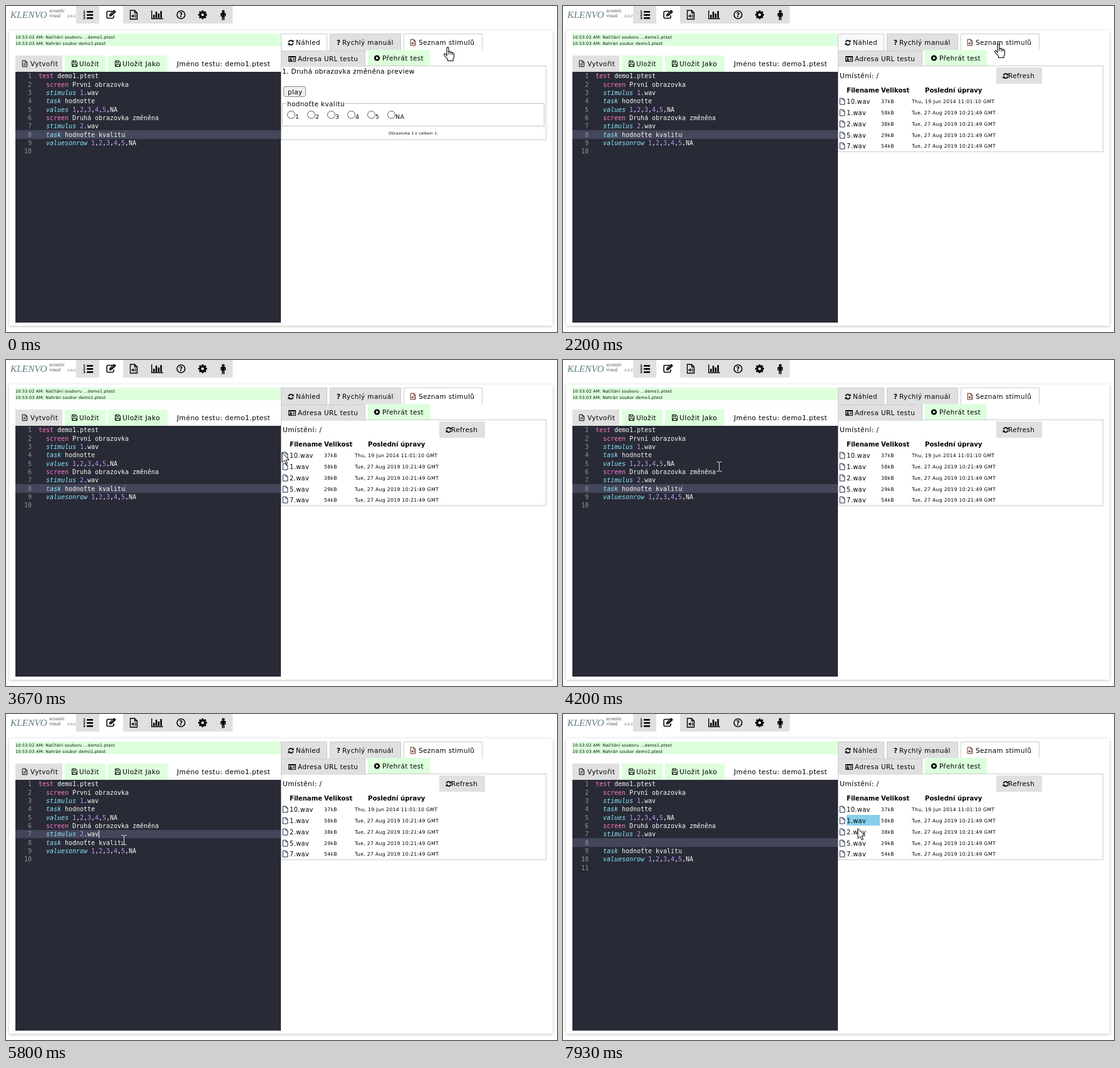
These frames come from a looping animation (880x520 px, 8 s). An HTML page with a canvas:

```html
<!DOCTYPE html>
<html lang="cs">
<head>
<meta charset="utf-8">
<title>Editor testu</title>
<style>
  html, body { margin: 0; width: 880px; height: 520px; overflow: hidden; background: #fff; }
  canvas { display: block; }
</style>
</head>
<body>
<canvas id="stage" width="880" height="520"></canvas>
<script>
const ctx = document.getElementById('stage').getContext('2d');
const LOOP = 8000, FPS = 15;
const SANS = '"DejaVu Sans", sans-serif', MONO = '"DejaVu Sans Mono", monospace';
const SERIF = '"Liberation Serif", serif';
const GRAY = '#e0e0e0', GREEN = '#ddffdd', BORDER = '#ccc';
const WHITE = '#f8f8f2', PINK = '#ff79c6', CYAN = '#8be9fd', PURPLE = '#bd93f9';
const UI = 10.4, CODE = 9.97, ROW = 40 / 3, CHAR = 6;

// Frame numbers of the events.
const LIST_OPEN = 33, CLICK = 72, ENTER = 93;

// Pointer keys: frame, x, y, eased.
const KEYS = [
  [20, 706, 65], [25, 696, 60, 1], [41, 696, 60], [47, 539, 125, 1],
  [54, 465, 144], [63, 249, 170], [66, 154, 198], [67, 160, 201],
  [68, 152, 193], [71, 152, 193], [78, 188, 201, 1], [106, 188, 201],
  [114, 472, 164, 1], [116, 472, 164], [119, 471, 182, 1]
];

const FILES = [
  ['10.wav', '37kB', 'Thu, 19 Jun 2014 11:01:10 GMT'],
  ['1.wav', '58kB', 'Tue, 27 Aug 2019 10:21:49 GMT'],
  ['2.wav', '38kB', 'Tue, 27 Aug 2019 10:21:49 GMT'],
  ['5.wav', '29kB', 'Tue, 27 Aug 2019 10:21:49 GMT'],
  ['7.wav', '54kB', 'Tue, 27 Aug 2019 10:21:49 GMT']
];

const SCRIPT = [
  'test demo1.ptest', '  screen První obrazovka', '  stimulus 1.wav', '  task hodnotte',
  '  values 1,2,3,4,5,NA', '  screen Druhá obrazovka změněna', '  stimulus 2.wav',
  '  task hodnoťte kvalitu', '  valuesonrow 1,2,3,4,5,NA', ''
];

function box(x, y, w, h, color) {
  ctx.fillStyle = color;
  ctx.fillRect(x, y, w, h);
}

function frame(x, y, w, h, color = BORDER) {
  ctx.strokeStyle = color;
  ctx.lineWidth = 1;
  ctx.strokeRect(x + .5, y + .5, w - 1, h - 1);
}

// Regular sans text is set slightly loose, as small screen type is.
function text(str, x, y, size = UI, color = '#000', style = '', family = SANS, align = 'left') {
  ctx.font = `${style} ${size}px ${family}`;
  ctx.letterSpacing = family === SANS && !style ? `${size * .04}px` : '0px';
  ctx.fillStyle = color;
  ctx.textAlign = align;
  ctx.fillText(str, x, y);
}

// Draws SVG path data at a place: an optional fill, then an optional stroke.
function draw(d, x, y, { fill, stroke, width = 1, scale = 1 }) {
  const path = new Path2D(d);
  ctx.save();
  ctx.translate(x, y);
  ctx.scale(scale, scale);
  ctx.lineWidth = width;
  if (fill) { ctx.fillStyle = fill; ctx.fill(path); }
  if (stroke) { ctx.strokeStyle = stroke; ctx.stroke(path); }
  ctx.restore();
}

function disc(x, y, r, fill, stroke, width = 1) {
  ctx.beginPath();
  ctx.arc(x, y, r, 0, 2 * Math.PI);
  if (fill) { ctx.fillStyle = fill; ctx.fill(); }
  if (stroke) { ctx.strokeStyle = stroke; ctx.lineWidth = width; ctx.stroke(); }
}

const PAGE = 'M1 1H8L12 5V15H1ZM8 1V5H12';

function fileIcon(x, y, scale, color = '#000') {
  draw(PAGE, x, y, { stroke: color, width: 1 / scale, scale });
}

function audioIcon(x, y, scale, color = '#000') {
  draw(PAGE, x, y, { stroke: color, width: 1.4, scale });
  draw('M3 9H4.5L6.5 7V13L4.5 11H3Z', x, y, { fill: color, scale });
  draw('M7.7 8.5Q9 10 7.7 11.5M9 7Q11.6 10 9 13', x, y, { stroke: color, scale });
}

function saveIcon(x, y) {
  draw('M.5 .5H6.5L8.5 2.5V9.5H.5ZM2.5 .5V3.5H6V.5M2 9.5V6H7V9.5', x, y, { stroke: '#000' });
}

function refreshIcon(x, y) {
  for (const turn of [0, Math.PI]) {
    ctx.save();
    ctx.translate(x, y);
    ctx.rotate(turn);
    draw('M-3.6 -.8A3.7 3.7 0 0 1 2.8 -2.4', 0, 0, { stroke: '#000', width: 1.7 });
    draw('M4.5 -4.5V-.7H.7Z', 0, 0, { fill: '#000' });
    ctx.restore();
  }
}

function gear(x, y) {
  ctx.save();
  ctx.translate(x, y);
  for (let i = 0; i < 8; i++) {
    box(-1.5, -7, 3, 4, '#000');
    ctx.rotate(Math.PI / 4);
  }
  ctx.restore();
  disc(x, y, 5.3, '#000');
  disc(x, y, 2.3, GRAY);
}

function header() {
  text('KLENVO', 7, 19, 15.4, '#5f7b84', 'italic', SERIF);
  text('acoustic', 69, 10, 7.6, '#555', '', SERIF);
  text('visual', 69, 18, 7.6, '#555', '', SERIF);
  text('2.0.2', 98, 18, 6.6, '#555', '', SERIF);

  box(112, 0, 250, 28, GRAY);
  box(149, 0, 38, 28, '#fff');
  for (let i = 0; i < 3; i++) {
    box(129, 8 + i * 5, 10, 2.6, '#000');
    text(i + 1, 123, 11.3 + i * 5, 5.6, '#000', 'bold');
  }
  draw('M10 2.5H3Q1 2.5 1 4.5V11.5Q1 13.5 3 13.5H10Q12 13.5 12 11.5V9', 160, 6, { stroke: '#000', width: 1.5 });
  draw('M5 10.5V7.5L11.8 .8Q12.8 0 13.8 1L15.2 2.4Q16 3.3 15.2 4.1L8 10.5Z', 160, 6, { fill: '#000' });
  draw('M6.3 8L7.7 9.4M8 7L12 3', 160, 6, { stroke: '#fff', width: .8 });
  audioIcon(197.5, 6, 1);
  draw('M.7 1V14.3H19', 232, 6, { stroke: '#000', width: 1.4 });
  [5, 10, 7, 11].forEach((h, i) => box(235 + i * 3.8, 19 - h, 2.5, h, '#000'));
  disc(279.5, 14, 6.3, null, '#000', 1.6);
  text('?', 279.5, 18, 10, '#000', 'bold', SANS, 'center');
  gear(314, 14);
  disc(347, 8.8, 2.3, '#000');
  draw('M2 0H9Q10.5 0 10.5 1.5V7H8.6V3H8V14H6V8.5H5V14H3V3H2.4V7H.5V1.5Q.5 0 2 0Z', 342.3, 11, { fill: '#000', scale: .83 });
}

function card() {
  ctx.save();
  for (const [blur, alpha] of [[4, .2], [8, .06]]) {
    ctx.shadowColor = `rgba(0,0,0,${alpha})`;
    ctx.shadowBlur = blur;
    ctx.shadowOffsetY = 1;
    box(5, 39, 868, 471, '#fff');
  }
  ctx.restore();
}

function toolbar() {
  box(15, 44, 424, 20, GREEN);
  text('10:53:02 AM: Načítání souboru ...demo1.ptest', 15, 52, 6.4);
  text('10:53:03 AM: Nahrán soubor demo1.ptest', 15, 62, 6.4);
  box(15, 79, 75, 26, GRAY);
  box(94, 79, 65, 26, GREEN);
  box(163, 79, 95, 26, GREEN);
  fileIcon(25.5, 86.5, .68);
  draw('M3.5 8H9.5M3.5 11H9.5', 25.5, 86.5, { stroke: '#000', width: 1.3, scale: .68 });
  saveIcon(105, 87);
  saveIcon(174, 87);
  text('Vytvořit', 39, 96);
  text('Uložit', 117, 96);
  text('Uložit Jako', 186, 96, 10.7);
  text('Jméno testu: demo1.ptest', 273, 96, 10.7);
}

function codeLine(line, y) {
  const [, indent, keyword, rest] = line.match(/^(\s*)(\S*)(.*)$/);
  let x = 52 + indent.length * CHAR;
  const plain = /^(test|screen)$/.test(keyword);
  text(keyword, x, y, CODE, plain ? PINK : CYAN, plain ? '' : 'italic', MONO);
  x += keyword.length * CHAR;
  for (const part of rest.split(/(\b\d\b)/)) {
    text(part, x, y, CODE, /^\d$/.test(part) ? PURPLE : WHITE, '', MONO);
    x += part.length * CHAR;
  }
}

function editor(n) {
  const lines = SCRIPT.slice();
  if (n >= ENTER) lines.splice(7, 0, '');
  const active = n >= CLICK && n < ENTER ? 6 : 7;
  const rowTop = i => Math.round(105 + i * ROW);
  const top = rowTop(active);

  box(15, 105, 424, 400, '#282a36');
  box(15, top, 424, rowTop(active + 1) - top, '#44475a');
  lines.forEach((line, i) => {
    const y = 115 + Math.ceil(i * ROW - .01);
    text(i + 1, 41, y, CODE, '#909194', '', MONO, 'right');
    codeLine(line, y);
  });

  // The caret is dim without focus and blinks with it.
  const focused = n >= CLICK;
  const start = n >= ENTER ? ENTER : CLICK;
  const caretX = n >= ENTER ? 64 : focused ? 148 : 190;
  ctx.globalAlpha = focused ? 1 : .2;
  if (!focused || (n - start) % 15 < 9) box(caretX, top, 1, 13, WHITE);
  ctx.globalAlpha = 1;
}

function tab(label, x, y, w, h, color, labelX, baseline) {
  box(x, y, w, h, color);
  if (color !== GREEN) {
    draw(`M.5 ${h}V.5H${w - .5}V${h}`, x, y, { stroke: BORDER });
  }
  text(label, labelX, baseline);
}

function tabs(n) {
  const fade = Math.min(1, Math.max(0, (n - LIST_OPEN + 1) / 5));
  const shade = Math.round(255 - 31 * fade);
  tab('Náhled', 439, 44, 74, 27, `rgb(${shade},${shade},${shade})`, 463, 62);
  tab('Rychlý manuál', 517, 44, 114, 27, GRAY, 537, 62);
  tab('Seznam stimulů', 635, 44, 126, 27, '#fff', 659, 62);
  tab('Přehrát test', 578, 70, 99, 25, GREEN, 601, 87);
  refreshIcon(455, 58.5);
  text('?', 528, 62, 10.5, '#000', 'bold');
  audioIcon(645.5, 52.5, .7, '#5a2010');
  disc(592.5, 83, 4.6, '#000');
  draw('M-1.3 -2.4L2.6 0L-1.3 2.4Z', 592.5, 83, { fill: '#fff' });
}

function addressTab() {
  tab('Adresa URL testu', 439, 71, 135, 26, GRAY, 466, 88);
  draw('M.5 .5H11.5V8.5H.5Z', 451, 80, { stroke: '#000' });
  box(451, 80, 12, 2, '#000');
  disc(454.7, 84, 1.3, '#000');
  box(452.5, 85.5, 4.5, 2, '#000');
  box(458, 83.5, 3.5, 1, '#000');
  box(458, 85.5, 3.5, 1, '#000');
}

function preview() {
  frame(439, 95, 424, 119);
  text('1. Druhá obrazovka změněna preview', 441, 108);
  ctx.beginPath();
  ctx.roundRect(443.5, 128.5, 35, 16, 3);
  ctx.fillStyle = '#efefef';
  ctx.fill();
  ctx.strokeStyle = '#888';
  ctx.lineWidth = 1;
  ctx.stroke();
  text('play', 450, 141);
  frame(441, 155, 419, 37, '#c0c0c0');
  box(447, 153, 95, 6, '#fff');
  text('hodnoťte kvalitu', 449, 160);
  ['1', '2', '3', '4', '5', 'NA'].forEach((label, i) => {
    disc(455.5 + i * 32, 173.5, 6, '#fff', '#555');
    text(label, 462 + i * 32, 180, 9.4);
  });
  text('Obrazovka 1 z celkem 1.', 611, 205, 6);
}

function fileList(hover) {
  frame(439, 95, 424, 138);
  text('Umístění: /', 442, 115, 10.7);
  box(692, 98, 73, 26, GRAY);
  refreshIcon(707, 111.5);
  text('Refresh', 711, 115);
  text('Filename', 453, 138, 10.1, '#000', 'bold');
  text('Velikost', 508, 138, 10.1, '#000', 'bold');
  text('Poslední úpravy', 578, 138, 10.1, '#000', 'bold');
  FILES.forEach(([name, size, date], i) => {
    const top = Math.round(143.4 + i * 17.7);
    if (i === hover) box(453, top, 53, 17, '#87ceeb');
    fileIcon(441.5, top + 3.5, .7, '#224');
    text(name, 453, top + 13, 9.8);
    text(size, 508, top + 12, 7.75);
    text(date, 557, top + 12, 7.75);
  });
}

function pointerAt(n) {
  const next = KEYS.findIndex(key => key[0] >= n);
  if (next <= 0) return KEYS[0].slice(1, 3);
  const [n0, x0, y0] = KEYS[next - 1], [n1, x1, y1, eased] = KEYS[next];
  let k = (n - n0) / (n1 - n0);
  if (eased) k = k * k * (3 - 2 * k);
  return [x0 + (x1 - x0) * k, y0 + (y1 - y0) * k];
}

// The highlight stays behind on the last short move of the pointer.
function hoveredFile(n) {
  const [x, y] = pointerAt(Math.min(n, 116));
  return x >= 453 && x < 506 && y >= 143.4 ? Math.floor((y - 143.4) / 17.7) : -1;
}

function pointer(n) {
  const [x, y] = pointerAt(n).map(Math.round);
  if (x < 439) {
    draw('M-3.5 -7.5H-1L.5 -6.5L2 -7.5H4.5M.5 -6.5V6.5M-3.5 7.5H-1L.5 6.5L2 7.5H4.5', x, y, { stroke: '#ddd' });
  } else if (y < 96) {
    draw('M5 14V2Q5 .5 6.5 .5Q8 .5 8 2V8Q9.7 7 11 8.5Q12.7 7.8 13.7 9.5Q16.5 9 16.5 12V16Q16.5 18 15 20V22.5H6.5V20L1 14Q0 12 1.5 11Q3 11 5 14Z',
      x - 7, y, { fill: '#fff', stroke: '#000', width: 1.1 });
    draw('M8 8V12M11 9V12.5M13.7 10V13', x - 7, y, { stroke: '#000' });
  } else {
    draw('M.5 .5V16.5L4.2 13L6.7 18.8L9 17.8L6.6 12.2H11.7Z', x - .5, y, { fill: '#fff', stroke: '#000' });
  }
}

function render() {
  const time = performance.now() % LOOP;
  const n = Math.floor((time + 5) * FPS / 1000) % (LOOP * FPS / 1000);
  box(0, 0, 880, 520, '#fff');
  header();
  card();
  toolbar();
  editor(n);
  tabs(n);
  if (n < LIST_OPEN) preview();
  else fileList(hoveredFile(n));
  addressTab();
  pointer(n);
  requestAnimationFrame(render);
}

render();
</script>
</body>
</html>
```
